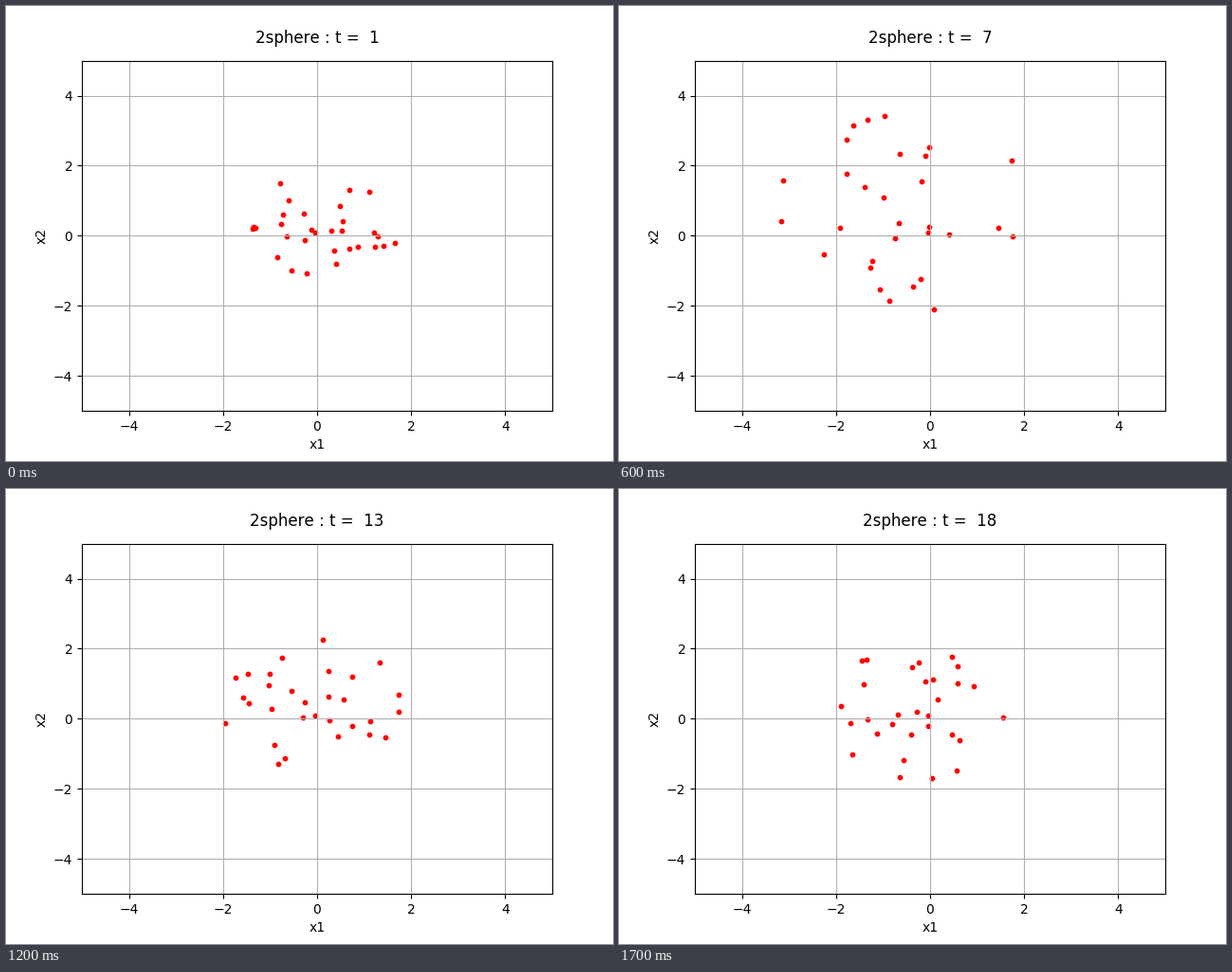
A matplotlib script that plays this animation: 640x480 px, repeating every 1.8 s.

```python
import numpy as np
import matplotlib.pyplot as plt
from matplotlib.animation import FuncAnimation

# Whole-pixel kerning spaces the letters of the title
plt.rcParams["text.kerning_factor"] = 6

STEPS = 18
STEP_MS = 100
PARTICLES = 29
BEST = (-0.04, 0.08)    # the leading particle stays near the optimum

# The swarm bursts outwards, then drifts and contracts
key_steps = (1, 3, 5, 9, 12, 15, 18)
center_x = (0.15, -0.50, -0.80, -0.75, -0.30, 0.25, -0.10)
center_y = (0.20, 0.15, 0.50, 0.75, 0.60, 0.60, 0.15)
size = (0.75, 1.85, 1.60, 1.15, 1.00, 0.85, 0.95)

rng = np.random.default_rng(4)
radius = 2.15 * (np.arange(PARTICLES) / PARTICLES + 0.02) ** 0.6
angle = rng.uniform(0, 2 * np.pi, PARTICLES)
turn_rate = rng.normal(0.33, 0.06, PARTICLES)


def positions(step):
    cx, cy, scale = (np.interp(step, key_steps, values)
                     for values in (center_x, center_y, size))
    # Clockwise swirl once the burst is over
    a = angle - turn_rate * max(step - 3, 0)
    x = cx + scale * radius * np.cos(a)
    y = cy + scale * radius * np.sin(a)
    return np.vstack([np.column_stack([x, y]), BEST])


fig, ax = plt.subplots(figsize=(6.4, 4.8), dpi=100)
ax.set(xlim=(-5, 5), ylim=(-5, 5), xlabel="x1", ylabel="x2")
ax.set_xticks(range(-4, 5, 2))
ax.set_yticks(range(-4, 5, 2))
ax.grid(True)
dots = ax.scatter(*positions(1).T, s=10, c="red")
title = ax.text(0.5, 1.05, "", transform=ax.transAxes, ha="center",
                fontsize="large")


def draw(i):
    step = i + 1
    dots.set_offsets(positions(step))
    title.set_text(f"2sphere : t =  {step}")
    return dots, title


anim = FuncAnimation(fig, draw, frames=STEPS, interval=STEP_MS,
                     repeat=True, repeat_delay=0)
plt.show()
```
